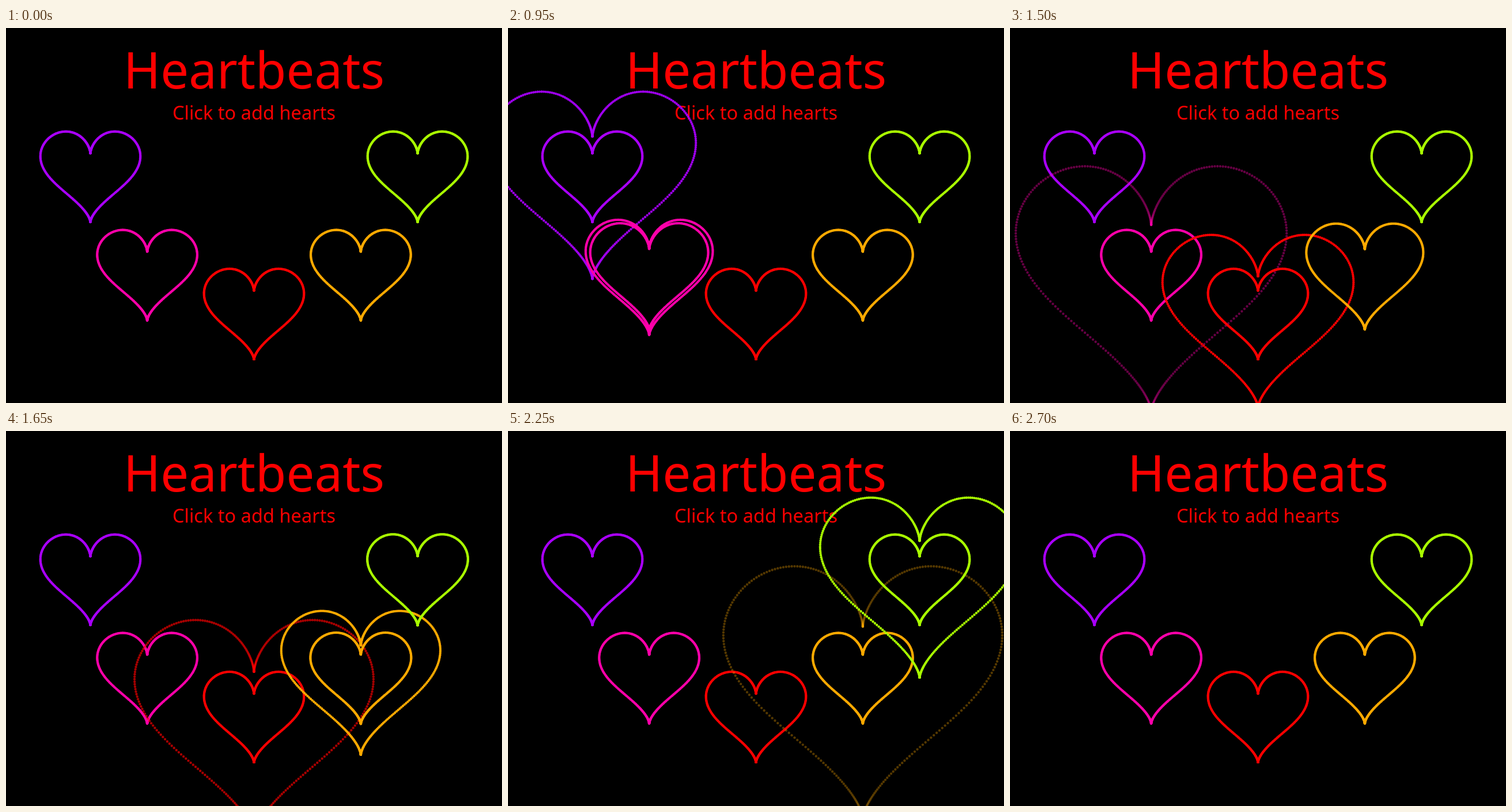
These frames come from a looping animation (861 px wide and 651 px high, 2.85 s). An HTML page with a canvas:

```html
<!DOCTYPE html>
<html>
<head>
<meta charset="utf-8">
<title>Heartbeats</title>
<style>
  html, body { margin: 0; width: 100%; height: 100%; overflow: hidden; background: #000; }
  canvas { display: block; }
</style>
</head>
<body>
<canvas id="stage" width="861" height="651"></canvas>
<script>
const ctx = document.getElementById('stage').getContext('2d');
const WIDTH = 861, HEIGHT = 651, LOOP = 2850;

const HEARTS = 5, SPREAD = 40;          // hearts on an arc, degrees apart
const ARC_Y = 194.3, ARC_RADIUS = 288.4;
const BASE = HEIGHT / 120;              // resting scale of a heart
const PEAK = BASE * 1.2;                // scale at the top of a beat
const BEAT_GAP = 1000 / 3;              // ms between neighbouring beats
const BEAT_WIDTH = 91;                  // ms
const RING_SPEED = 0.013;               // scale units per ms
const RING_LIFE = 830, RING_FADE = 508; // ms
const DOTS = 360, DOT_RADIUS = HEIGHT / 300;
const STEP = 100;                       // ms between pictures

const radians = degrees => degrees * Math.PI / 180;
const bell = x => Math.exp(-x * x);

// The arc runs from upper left to upper right; the hue follows the angle.
const hearts = Array.from({ length: HEARTS }, (_, i) => {
  const angle = (i - (HEARTS - 1) / 2) * SPREAD;
  return {
    x: WIDTH / 2 + ARC_RADIUS * Math.sin(radians(angle)),
    y: ARC_Y + ARC_RADIUS * Math.cos(radians(angle)),
    hue: (angle + 360) % 360,
  };
});

const outline = Array.from({ length: DOTS }, (_, i) => {
  const a = radians(i * 360 / DOTS);
  return [
    16 * Math.sin(a) ** 3,
    -(13 * Math.cos(a) - 5 * Math.cos(2 * a) - 2 * Math.cos(3 * a) - Math.cos(4 * a)),
  ];
});

function drawHeart({ x, y, hue }, scale, alpha = 1) {
  ctx.fillStyle = `hsla(${hue}, 100%, 50%, ${alpha})`;
  for (const [px, py] of outline) {
    ctx.beginPath();
    ctx.arc(x + px * scale, y + py * scale, DOT_RADIUS, 0, 2 * Math.PI);
    ctx.fill();
  }
}

function drawText(text, size, baseline) {
  ctx.font = `${size}px "Noto Sans", sans-serif`;
  ctx.fillText(text, WIDTH / 2, baseline);
}

// Time since the first beat peaked, in even steps that run slightly ahead mid-loop.
function beatClock(time) {
  const ahead = 0.6 * bell((time - 1800) / 400);
  return 63 + STEP * Math.floor((time - 600) / STEP + ahead);
}

function draw(clock) {
  ctx.fillStyle = '#000';
  ctx.fillRect(0, 0, WIDTH, HEIGHT);
  ctx.fillStyle = '#f00';
  ctx.textAlign = 'center';
  drawText('Heartbeats', HEIGHT / 7.5, 105);
  drawText('Click to add hearts', HEIGHT / 20, 159);

  hearts.forEach((heart, i) => {
    const age = clock - i * BEAT_GAP;
    drawHeart(heart, BASE + (PEAK - BASE) * bell(age / BEAT_WIDTH));
    if (age > 0 && age < RING_LIFE) {
      drawHeart(heart, PEAK + RING_SPEED * age, Math.min(1, (RING_LIFE - age) / RING_FADE));
    }
  });
}

let start;
function tick(now) {
  start ??= now;
  draw(beatClock((now - start) % LOOP));
  requestAnimationFrame(tick);
}
requestAnimationFrame(tick);
</script>
</body>
</html>
```
